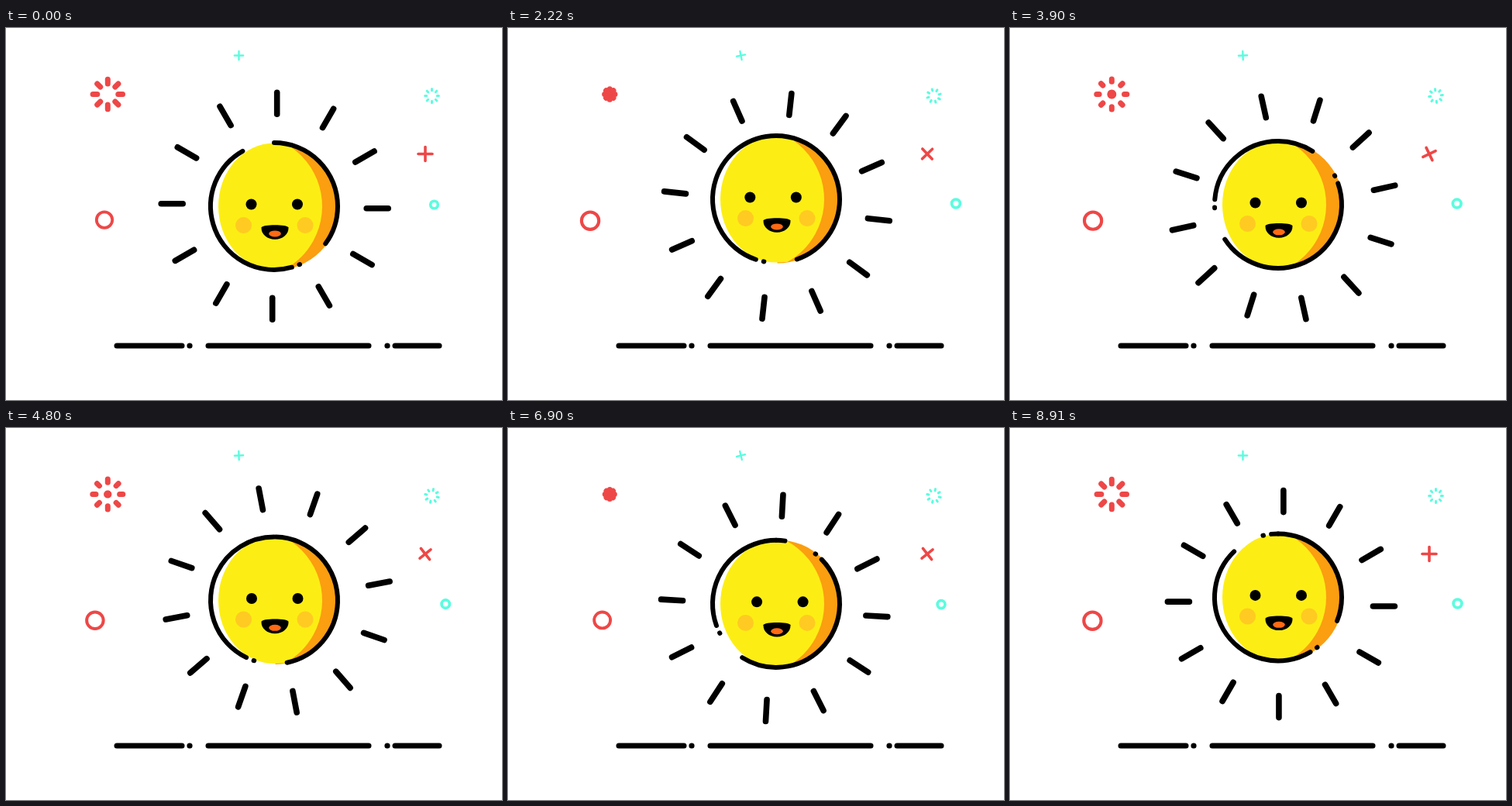
Write an HTML page with a canvas that moves like this. It is 640x480 px and loops after 8940 ms.

```html
<!DOCTYPE html>
<html>
<head>
<meta charset="utf-8">
<title>Smiling sun</title>
<style>
html, body { margin: 0; height: 100%; overflow: hidden; background: #fff; }
canvas { display: block; }
</style>
</head>
<body>
<canvas id="stage" width="640" height="480"></canvas>
<script>
const ctx = document.getElementById('stage').getContext('2d');
const LOOP = 8940, STEP = 30;
const RED = '#ee4747', TEAL = '#5cfcdf', INK = '#000';
const rad = deg => deg * Math.PI / 180;

// Linear interpolation through [time, value] pairs.
function track(keys, t) {
  const i = keys.findIndex(k => k[0] >= t);
  if (i < 0) return keys[keys.length - 1][1];
  if (i === 0) return keys[0][1];
  const [t0, v0] = keys[i - 1], [t1, v1] = keys[i];
  return v0 + (v1 - v0) * (t - t0) / (t1 - t0);
}

const BOB = [[0, 230], [1770, 218], [3560, 230], [5530, 218], [7390, 230], [8910, 218.4]];
const GAZE = [[0, 0], [1990, -5], [3360, 0], [4670, 0], [5970, 5], [6780, 5], [8200, 0]];
const DRIFT = [[0, 0], [2970, 1], [6195, 0], [8910, 0.735]];
const TWIST = [[0, 0], [1410, 70], [3030, 87], [4800, 88], [5970, 137], [6900, 166], [8400, 180]];

function at(x, y, deg, draw) {
  ctx.save();
  ctx.translate(x, y);
  ctx.rotate(rad(deg));
  draw();
  ctx.restore();
}

function line(x1, y1, x2, y2) {
  ctx.beginPath();
  ctx.moveTo(x1, y1);
  ctx.lineTo(x2, y2);
  ctx.stroke();
}

function pen(color, width) {
  ctx.strokeStyle = color;
  ctx.lineWidth = width;
}

function oval(x, y, rx, ry, color) {
  ctx.fillStyle = color;
  ctx.beginPath();
  ctx.ellipse(x, y, rx, ry, 0, 0, 7);
  ctx.fill();
}

function ring(x, y, r, color, width) {
  pen(color, width);
  ctx.beginPath();
  ctx.arc(x, y, r, 0, 7);
  ctx.stroke();
}

function spokes(count, r1, r2, shift = 0) {
  for (let i = 0; i < count; i++)
    at(0, 0, i * 360 / count, () => line(shift, -r1, shift, -r2));
}

function plus(x, y, arm, deg, color, width) {
  pen(color, width);
  at(x, y, deg, () => { line(-arm, 0, arm, 0); line(0, -arm, 0, arm); });
}

// Each spoke is a short window sliding outward and wrapping to the centre.
function burst(t) {
  const reach = 19.5, len = 5.7;
  const from = (13.5 + 0.0207 * Math.min(t, 8478)) % reach;
  pen(RED, 7);
  at(131.3, 85.5, 0, () => {
    spokes(8, from, Math.min(from + len, reach));
    if (from + len > reach) spokes(8, 0.01, from + len - reach);
  });
}

function body() {
  ctx.fillStyle = '#fb9e10';
  ctx.beginPath();
  ctx.arc(347.5, 0, 82.5, -Math.PI / 2, Math.PI / 2);
  ctx.fill();
  ctx.fillStyle = '#fcee14';
  ctx.beginPath();
  ctx.ellipse(346, 0, 72, 81.5, 0, Math.PI / 2, Math.PI * 1.5);
  ctx.lineTo(360, -80.9);
  const a = Math.atan2(80.9, 44.4);
  ctx.arc(315.7, 0, 92.3, -a, a);
  ctx.lineTo(346, 81.5);
  ctx.fill();
}

function face(look) {
  for (const x of [306.5, 386]) oval(x, 24.6, 10.5, 10.5, '#ffca22');
  for (const x of [316.5, 376]) oval(x + look, -2.5, 7, 7, INK);
  ctx.beginPath();
  ctx.moveTo(329.5, 27.5);
  ctx.bezierCurveTo(330, 23, 364, 23, 364.5, 27.5);
  ctx.bezierCurveTo(365, 36, 357, 42.7, 347, 42.7);
  ctx.bezierCurveTo(337, 42.7, 329, 36, 329.5, 27.5);
  ctx.fill();
  oval(347, 35.4, 7.8, 4, '#ff6a13');
}

// Dash-and-dot outline; the pattern slides along a circle that opens at the top.
function outline(t) {
  const period = 204.2, dash = 166.5;
  const first = (163.8 - 0.0763 * Math.min(t, 8215)) % period - period;
  pen(INK, 6);
  const arc = (from, to) => {
    ctx.beginPath();
    ctx.arc(346, 0, 82, rad(from - 90), rad(to - 90));
    ctx.stroke();
  };
  for (let s = first; s < 380; s += period) {
    const from = Math.max(s, 0), to = Math.min(s + dash, 360);
    if (to > from) arc(from, to);
    const dot = s - 7.6;
    if (dot >= 0 && dot <= 360) arc(dot, dot + 0.4);
  }
}

function rays(t) {
  pen(INK, 7.6);
  at(348.3, 4.2, -0.06475 * Math.min(t, 8340), () => {
    ctx.translate(-1.6, -4.5);
    spokes(12, 118.5, 146.5, 3);
  });
}

function ground() {
  pen(INK, 7);
  for (const [a, b] of [[143, 227], [236.9, 237.1], [261, 468], [491.9, 492.1], [502, 559]])
    line(a, 410, b, 410);
}

function draw(t) {
  ctx.fillStyle = '#fff';
  ctx.fillRect(0, 0, 640, 480);
  ctx.lineCap = 'round';

  const drift = track(DRIFT, t), spin = Math.min(t, 8400) / 8400 * 360;
  burst(t);
  plus(300.5, 35.5, 5.6, track(TWIST, t), TEAL, 2.4);
  plus(541, 162.5, 9, spin * 9, RED, 3.6);
  pen(TEAL, 3);
  at(549.5, 87.5, -spin * 3, () => spokes(8, 6.8, 8.9));
  ring(127 - 28 * drift, 247.6 + 1.5 * drift, 10.2 + 1.3 * drift, RED, 3.8 + 0.4 * drift);
  ring(552.5 + 34 * drift, 228 - 2 * drift, 4.8 + 0.8 * drift, TEAL, 3.6 + 0.3 * drift);

  at(0, track(BOB, t), 0, () => {
    body();
    face(track(GAZE, t));
    outline(t);
    rays(t);
  });
  ground();
}

const start = performance.now();
function frame() {
  const t = (performance.now() - start) % LOOP;
  draw(Math.floor(t / STEP) * STEP);
  requestAnimationFrame(frame);
}
frame();
</script>
</body>
</html>
```
